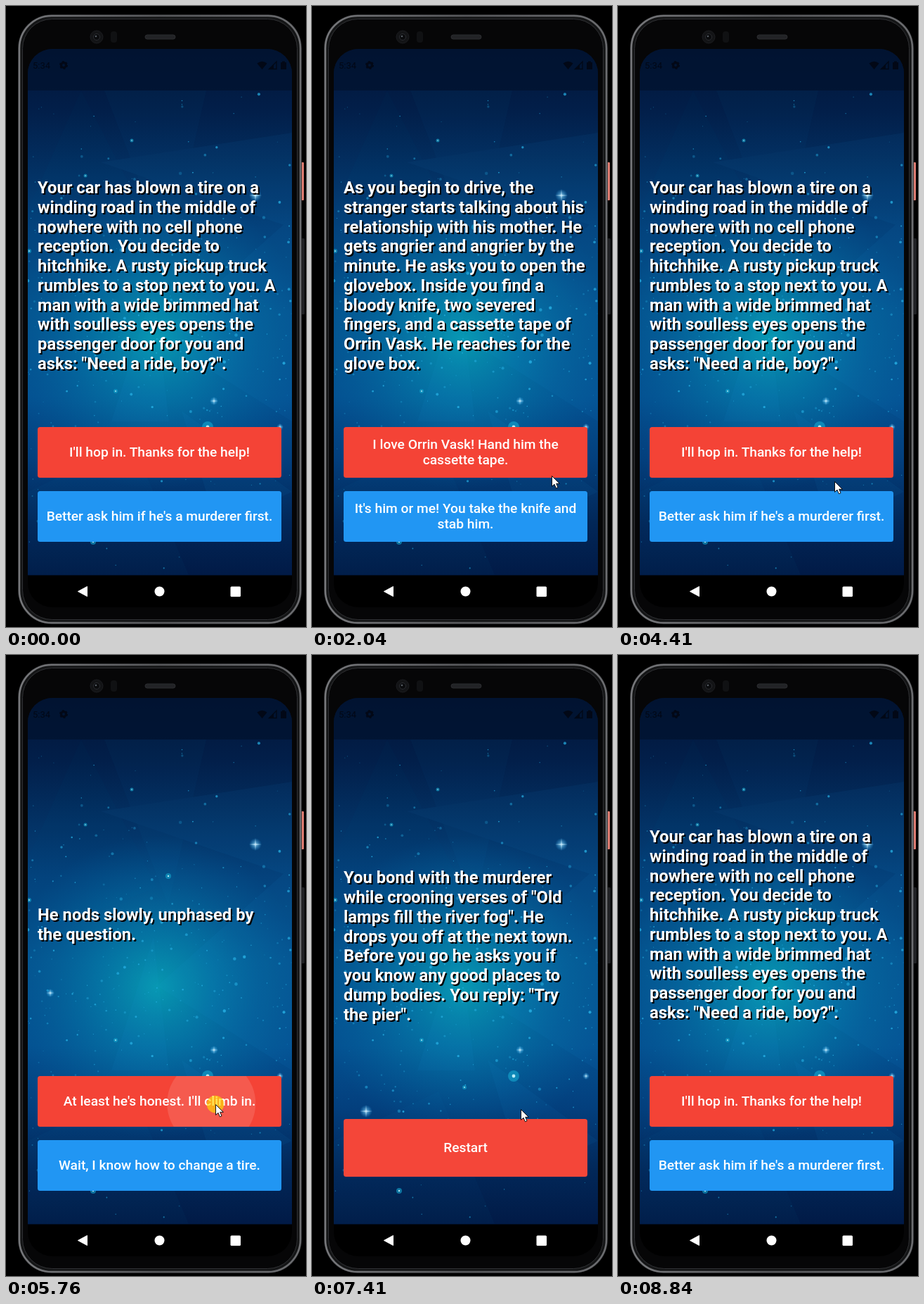
Recreate the animation shown at these times as an HTML page. Size 427 by 882 pixels, loop 9080 ms.

```html
<!DOCTYPE html>
<html lang="en">
<head>
<meta charset="utf-8">
<title>Story game</title>
<style>
html, body { margin: 0; width: 100%; height: 100%; overflow: hidden; background: #000; }
#stage { position: relative; width: 427px; height: 882px; overflow: hidden; font-family: Roboto, sans-serif; color: #fff; }
#stage > * { position: absolute; }
svg { left: 0; top: 0; }
#story {
  left: 45px; white-space: pre;
  font-size: 23.8px; font-weight: 700; line-height: 27.75px;
  text-shadow: 2px 2px 0 #000;
}
.button {
  left: 45px; width: 347px; overflow: hidden; border-radius: 3.5px;
  display: flex; align-items: center; justify-content: center;
  font-size: 19.2px; font-weight: 500; line-height: 22.2px;
  white-space: pre; text-align: center;
}
.button span { position: relative; top: .4px; }
.button i { position: absolute; border-radius: 50%; background: #fff; transform: translate(-50%, -50%); }
#red { background: #f44336; }
#blue { background: #2196f3; top: 689px; height: 72px; }
</style>
</head>
<body>
<div id="stage">
  <svg width="427" height="882">
    <defs>
      <linearGradient id="sky" x2="0" y2="1">
        <stop offset="0" stop-color="#021538"/>
        <stop offset=".12" stop-color="#021f4a"/>
        <stop offset=".24" stop-color="#033265"/>
        <stop offset=".34" stop-color="#04427c"/>
        <stop offset=".5" stop-color="#04528e"/>
        <stop offset=".66" stop-color="#045191"/>
        <stop offset=".78" stop-color="#033f7d"/>
        <stop offset=".9" stop-color="#022758"/>
        <stop offset="1" stop-color="#011a46"/>
      </linearGradient>
      <radialGradient id="glow" gradientUnits="userSpaceOnUse" cx="215" cy="472" r="215">
        <stop offset="0" stop-color="#07a0b4" stop-opacity=".9"/>
        <stop offset=".4" stop-color="#0584ae" stop-opacity=".62"/>
        <stop offset="1" stop-color="#0465a0" stop-opacity="0"/>
      </radialGradient>
      <radialGradient id="flare">
        <stop offset="0" stop-color="#fff"/>
        <stop offset=".25" stop-color="#8fdcff" stop-opacity=".7"/>
        <stop offset="1" stop-color="#29a8f0" stop-opacity="0"/>
      </radialGradient>
      <linearGradient id="rim" x2="1">
        <stop offset="0" stop-color="#77787b"/>
        <stop offset=".5" stop-color="#555659"/>
        <stop offset="1" stop-color="#6c6d70"/>
      </linearGradient>
      <clipPath id="screen"><rect x="31" y="61" width="376" height="793" rx="35"/></clipPath>
    </defs>

    <rect x="420" y="222" width="4" height="54" rx="1" fill="#df7d72"/>
    <rect x="420" y="330" width="5" height="108" rx="1.5" fill="#202124"/>
    <rect x="17" y="12" width="404" height="866" rx="48" fill="#2a2b2d"/>
    <rect x="19" y="14" width="400" height="862" rx="46" fill="#141516" stroke="url(#rim)" stroke-width="2.5"/>
    <rect x="23.5" y="18.5" width="391" height="853" rx="42" fill="#060607" stroke="#303134"/>
    <circle cx="129" cy="44" r="9" fill="#131416" stroke="#1c1d20"/>
    <circle cx="129" cy="44" r="4.5" fill="#0a0b0d" stroke="#2a2b30"/>
    <circle cx="128" cy="43" r="1.3" fill="#555b63"/>
    <rect x="149" y="36" width="9" height="16" rx="4" fill="#101113"/>
    <rect x="198" y="41" width="43" height="6" rx="3" fill="#222326" stroke="#2b2c2f"/>

    <g clip-path="url(#screen)">
      <rect x="31" y="61" width="376" height="748" fill="url(#sky)"/>
      <rect x="31" y="61" width="376" height="748" fill="url(#glow)"/>
      <g fill="#2f9fe0" opacity=".055">
        <path d="M135 222 407 180V315Z" opacity="1"/>
        <path d="M140 120 231 355 285 120Z" opacity=".6"/>
        <path d="M31 290 107 120 215 330 31 400Z" opacity=".35"/>
        <path d="M215 470 407 300V590Z"/>
        <path d="M210 400 150 590H232Z"/>
        <path d="M250 575 407 690 300 740Z"/>
        <path d="M31 690 180 620 260 808H31Z" opacity=".6"/>
      </g>
      <g id="stars"></g>
      <rect x="31" y="61" width="376" height="59" fill="#021330" opacity=".8"/>
      <rect x="31" y="808.5" width="376" height="46" fill="#000"/>
      <g fill="#020816">
        <text x="38" y="89" font-size="13" font-family="Roboto, sans-serif">5:34</text>
        <circle cx="82" cy="84" r="3.5" fill="none" stroke="#020816" stroke-width="3"/>
        <circle cx="82" cy="84" r="5" fill="none" stroke="#020816" stroke-width="2" stroke-dasharray="2.6 2.63"/>
        <path d="M357.500 81.500Q364.500 76 371.500 81.500L364.500 90Z"/>
        <path d="M374.500 89.500 385 79V89.500Z" fill="none" stroke="#020816" stroke-width="1.3"/>
        <path d="M375 89.500 381 83.500V89.500Z"/>
        <path d="M391 80H393V78.500H397V80H399V90H391Z"/>
      </g>
      <g fill="#fff">
        <path d="M102.500 831.500 115.500 824.500V838.500Z" stroke="#fff" stroke-linejoin="round"/>
        <circle cx="218.500" cy="831.500" r="7"/>
        <rect x="319.500" y="824.500" width="14.500" height="14.500" rx="1.500"/>
      </g>
    </g>
  </svg>

  <div id="story"></div>
  <div class="button" id="red"><i></i><span></span></div>
  <div class="button" id="blue"><i></i><span></span></div>

  <svg width="427" height="882">
    <g id="pointer">
      <circle id="dot" r="12.3" fill="#ffdc00" opacity=".65"/>
      <path d="M.5.5V15.300L4 12.200 6.400 17.800 9 16.700 6.700 11.300H11.300Z" fill="#fff" stroke="#000" stroke-width=".9"/>
    </g>
  </svg>
</div>

<script>
const LOOP = 9080, STEP = 80, RELEASE = 130;
const $ = id => document.getElementById(id);

const car = {
  story: `Your car has blown a tire on a
winding road in the middle of
nowhere with no cell phone
reception. You decide to
hitchhike. A rusty pickup truck
rumbles to a stop next to you. A
man with a wide brimmed hat
with soulless eyes opens the
passenger door for you and
asks: "Need a ride, boy?".`,
  red: "I'll hop in. Thanks for the help!",
  blue: "Better ask him if he's a murderer first."
};
const drive = {
  story: `As you begin to drive, the
stranger starts talking about his
relationship with his mother. He
gets angrier and angrier by the
minute. He asks you to open the
glovebox. Inside you find a
bloody knife, two severed
fingers, and a cassette tape of
Orrin Vask. He reaches for the
glove box.`,
  red: "I love Orrin Vask! Hand him the\ncassette tape.",
  blue: "It's him or me! You take the knife and\nstab him."
};
const crash = {
  story: `As you smash through the
guardrail and careen towards
the jagged rocks below you
reflect on the dubious wisdom
of stabbing someone while they
are driving a car you are in.`,
  red: "Restart"
};
const nods = {
  story: "He nods slowly, unphased by\nthe question.",
  red: "At least he's honest. I'll climb in.",
  blue: "Wait, I know how to change a tire."
};
const bond = {
  story: `You bond with the murderer
while crooning verses of "Old
lamps fill the river fog". He
drops you off at the next town.
Before you go he asks you if
you know any good places to
dump bodies. You reply: "Try
the pier".`,
  red: "Restart"
};

// [start, scene]
const scenes = [[0, car], [1330, drive], [2600, crash], [3460, car],
  [4880, nods], [5840, drive], [7020, bond], [8200, car]];

// [start, button, x, y]; y is measured inside the button
const presses = [[1170, "red", 347, 42], [2440, "blue", 330, 21], [3300, "red", 330, 51],
  [4720, "blue", 300, 1], [5680, "red", 298, 39], [6860, "red", 297, 47], [8040, "red", 296, 15]];

// [start, x, y]; no position means the pointer is off the stage
const pointerPath = [[0], [70, 419, 826], [140],
  [300, 418, 671], [380, 388, 660], [460, 366, 650], [540, 353, 643], [620, 347, 640],
  [2040, 341, 667], [2120, 333, 700], [2200, 330, 710],
  [4410, 308, 675], [4490, 303, 680], [4570, 301, 685], [4650, 300, 688],
  [5360, 299, 660], [5440, 298, 638], [6540, 297, 641], [6620, 297, 645],
  [7490, 298, 652], [7570, 297, 660], [7650, 297, 666], [7730, 297, 670],
  [7810, 296, 672], [7890, 296, 674], [8680, 330, 740], [8760, 386, 866], [8840]];

const latest = (list, t) => list.findLast(item => item[0] <= t);
const clamp = v => Math.min(1, Math.max(0, v));

// cubic-bezier(.25, .1, .25, 1)
function ease(x) {
  let lo = 0, hi = 1;
  const bezier = (s, a, b) => 3 * a * s * (1 - s) ** 2 + 3 * b * s * s * (1 - s) + s ** 3;
  for (let i = 0; i < 18; i++) {
    const mid = (lo + hi) / 2;
    if (bezier(mid, .25, .25) < x) lo = mid; else hi = mid;
  }
  return bezier(lo, .1, 1);
}

function addStars() {
  let seed = 41;
  const random = () => (seed = seed * 16807 % 2147483647) / 2147483647;
  const circle = (x, y, r, fill, opacity) =>
    `<circle cx="${x}" cy="${y}" r="${r}" fill="${fill}" opacity="${opacity}"/>`;
  let out = "";
  for (let i = 0; i < 340; i++) {
    const x = 31 + random() * 376;
    const y = i % 3 ? 470 + (random() + random() - 1) * 260 : 125 + random() * 675;
    out += circle(x, y, .6 + random() ** 3 * 1.7, "#27b0e4", .25 + random() * .6);
  }
  for (const [x, y, r] of [[231, 314, 4], [287, 598, 8], [156, 547, 3], [179, 191, 2.5],
    [33, 348, 3], [124, 761, 4], [217, 614, 3], [113, 241, 2.5]]) {
    out += circle(x, y, r, "#16a8d0", .6) + circle(x, y, r * .3, "#c9f6ff", .9);
  }
  for (const [x, y, r] of [[355, 269, 9], [77, 648, 9], [63, 480, 6], [296, 561, 6], [390, 598, 5]]) {
    const k = r * .07;
    out += circle(x, y, r, "url(#flare)", .85) +
      `<path transform="translate(${x} ${y})" fill="#c5ecff" opacity=".8" d="M0 ${-r}L${k} ${-k} ${r} 0 ${k} ${k} 0 ${r} ${-k} ${k} ${-r} 0 ${-k} ${-k}Z"/>`;
  }
  $("stars").innerHTML = out;
}

function showScene({ story, red, blue }) {
  const middle = blue ? 383.9 : 414.4;
  $("story").textContent = story;
  $("story").style.top = middle - story.split("\n").length * 27.75 / 2 + "px";
  $("red").style.top = (blue ? 598 : 659) + "px";
  $("red").style.height = (blue ? 72 : 82) + "px";
  $("red").lastChild.textContent = red;
  $("blue").lastChild.textContent = blue || "";
  $("blue").style.display = blue ? "flex" : "none";
}

function drawRipple(id, press, age, height) {
  const style = $(id).firstChild.style;
  const active = press && press[1] === id && age < 520;
  style.display = active ? "block" : "none";
  if (!active) return;
  const [, , x, y] = press;
  const held = Math.min(age, RELEASE) / 1000;
  const p = ease(clamp(held + Math.max(0, age - RELEASE) / 225));
  const full = Math.hypot(348, height) / 2;
  const radius = full * .3 + (full * .7 + 5) * p;
  const left = x - 45;
  style.left = left + (174 - left) * p + "px";
  style.top = y + (height / 2 - y) * p + "px";
  style.width = style.height = radius * 2 + "px";
  style.opacity = .12 * clamp(age / 75) * (1 - clamp((age - RELEASE - 225) / 150));
}

let current;
function draw(now) {
  const t = now % LOOP;
  const scene = latest(scenes, t)[1];
  if (scene !== current) showScene(current = scene);

  const press = latest(presses, t);
  const age = press ? Math.floor((t - press[0]) / STEP) * STEP + 5 : Infinity;
  drawRipple("red", press, age, scene.blue ? 72 : 82);
  drawRipple("blue", press, age, 72);

  const [, x, y] = latest(pointerPath, t);
  $("pointer").style.display = x ? "" : "none";
  if (x) $("pointer").setAttribute("transform", `translate(${x} ${y})`);
  $("dot").style.display = age < 240 ? "" : "none";
}

addStars();
const start = performance.now();
function tick() {
  draw(performance.now() - start);
  requestAnimationFrame(tick);
}
tick();
</script>
</body>
</html>
```
